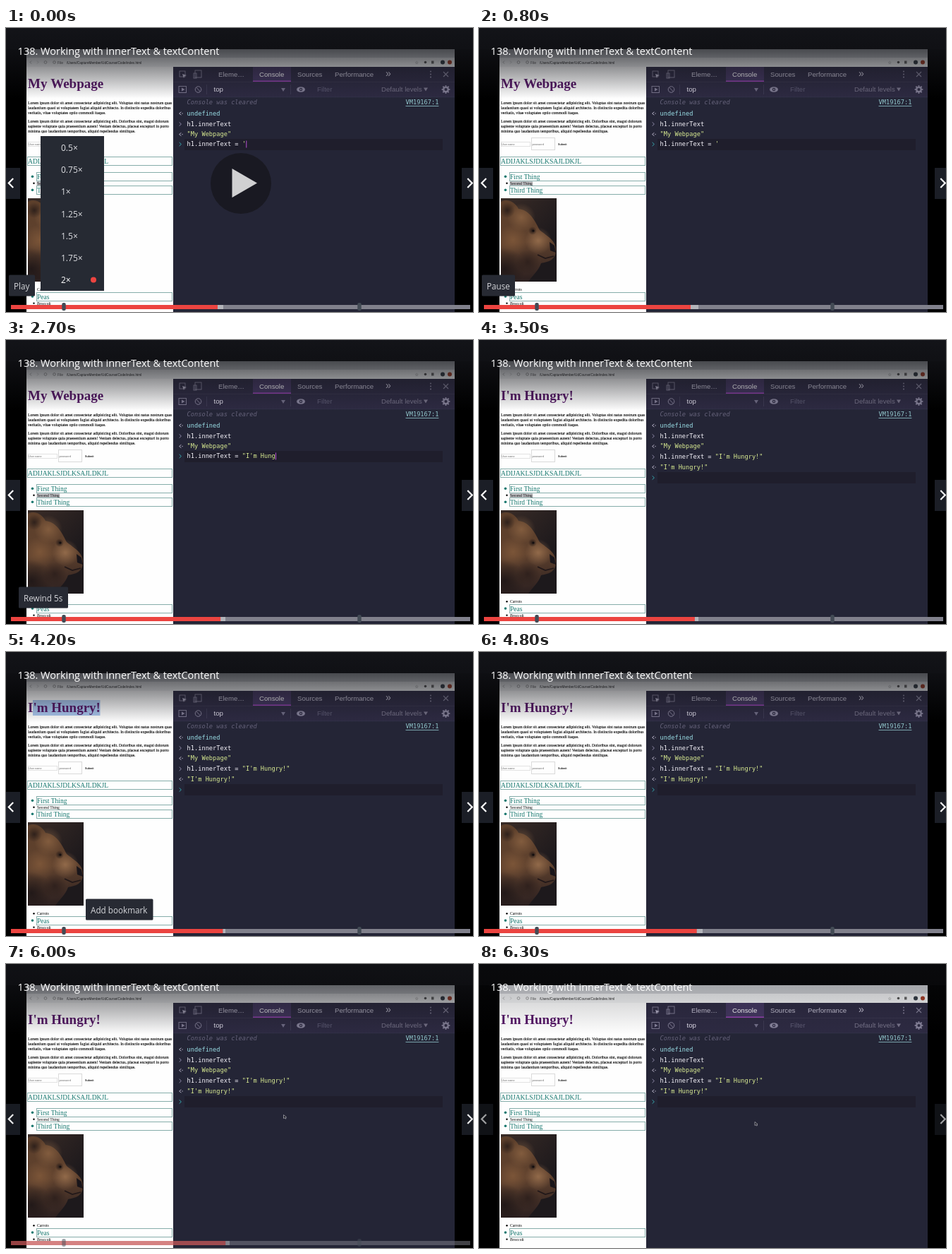
These frames come from a looping animation (662x402 px, 6400 ms). An HTML page with a canvas:

```html
<!DOCTYPE html>
<html lang="en">
<head>
<meta charset="utf-8">
<title>Lesson player</title>
<style>
html, body { margin: 0; width: 100%; height: 100%; overflow: hidden; background: #000; }
canvas { display: block; }
</style>
</head>
<body>
<canvas id="stage" width="662" height="402"></canvas>
<script>
const c = document.getElementById('stage').getContext('2d');
const LOOP = 6400;
const SERIF = '"Liberation Serif", serif';
const SANS = '"Liberation Sans", sans-serif';
const UI = '"Open Sans", sans-serif';
const MONO = '"DejaVu Sans Mono", monospace';
const TEAL = '#17786f', CODE = '#f6f4fb', STRING = '#d9eb92', ICON = '#858199';

const clamp = v => Math.max(0, Math.min(1, v));
const ramp = (t, a, b) => clamp((t - a) / (b - a));
const mix = (a, b, k) => a + (b - a) * k;

function rect(x, y, w, h, color) {
  c.fillStyle = color;
  c.fillRect(x, y, w, h);
}
function rounded(x, y, w, h, r, color) {
  c.fillStyle = color;
  c.beginPath();
  c.roundRect(x, y, w, h, r);
  c.fill();
}
function frame(x, y, w, h, color, line = 1) {
  c.strokeStyle = color;
  c.lineWidth = line;
  c.strokeRect(x, y, w, h);
}
function text(s, x, y, font, color) {
  c.font = font;
  c.fillStyle = color;
  c.fillText(s, x, y);
}
function dot(x, y, r, color) {
  c.fillStyle = color;
  c.beginPath();
  c.arc(x, y, r, 0, 7);
  c.fill();
}
function ring(x, y, r, color, line = 1) {
  c.strokeStyle = color;
  c.lineWidth = line;
  c.beginPath();
  c.arc(x, y, r, 0, 7);
  c.stroke();
}
function glow(x, y, r, rgb, alpha) {
  const g = c.createRadialGradient(x, y, 0, x, y, r);
  g.addColorStop(0, `rgba(${rgb},${alpha})`);
  g.addColorStop(1, `rgba(${rgb},0)`);
  dot(x, y, r, g);
}
function path(points, color, line) {
  c.beginPath();
  points.forEach(([x, y]) => c.lineTo(x, y));
  if (line) {
    c.strokeStyle = color;
    c.lineWidth = line;
    c.stroke();
  } else {
    c.closePath();
    c.fillStyle = color;
    c.fill();
  }
}
// dir 1 points right, -1 points left
const chevron = (x, y, w, h, dir, color, line) =>
  path([[x - dir * w, y - h], [x + dir * w, y], [x - dir * w, y + h]], color, line);

function browserBar() {
  rect(29, 30, 607, 12, '#d0d2d6');
  rect(29, 42, 607, 13, '#f3f4f5');
  chevron(35, 48.5, 1, 2, -1, '#777', 0.6);
  chevron(45, 48.5, 1, 2, 1, '#aaa', 0.6);
  ring(56, 48.5, 1.9, '#777', 0.6);
  ring(68.5, 48.5, 1.8, '#666', 0.6);
  text('File', 73, 50.5, '5px ' + SANS, '#555');
  text('/Users/CaptureMember/UdCourse/Code/index.html', 86, 50.5, '4.7px ' + SANS, '#222');
  text('☆', 579.5, 50.5, '6px "DejaVu Sans", sans-serif', '#444');
  dot(594.5, 48.5, 1.8, '#555');
  rect(603, 46.5, 3.5, 4, '#666');
  dot(619, 48.5, 3, '#333b44');
  dot(629, 48.5, 3, '#a63c25');
}

function paragraph(lines, y) {
  c.strokeStyle = '#111';
  c.lineWidth = 0.12;
  lines.forEach((s, i) => {
    text(s, 31, y + i * 7.1, '5.73px ' + SERIF, '#000');
    c.strokeText(s, 31, y + i * 7.1);
  });
}

function bigItem(label, y) {
  frame(43.5, Math.round(y) - 9.5, 192, 12, '#86adaa');
  dot(37.5, y - 3.5, 1.8, TEAL);
  text(label, 44, y, '9.5px ' + SERIF, TEAL);
}
function smallItem(label, y) {
  dot(39.5, y - 2, 1.2, '#000');
  text(label, 44, y, '5.73px ' + SERIF, '#000');
}

function bear() {
  c.save();
  c.beginPath();
  c.rect(31, 241, 79, 118);
  c.clip();
  const back = c.createLinearGradient(31, 241, 100, 300);
  back.addColorStop(0, '#3a2c27');
  back.addColorStop(1, '#1d191c');
  rect(31, 241, 79, 118, back);
  const fur = c.createLinearGradient(50, 250, 62, 359);
  fur.addColorStop(0, '#5c3f2b');
  fur.addColorStop(0.5, '#60422e');
  fur.addColorStop(1, '#2c2020');
  c.fillStyle = fur;
  c.beginPath();
  c.moveTo(31, 246);
  c.bezierCurveTo(40, 241, 51, 246, 56, 256);
  c.bezierCurveTo(72, 258, 79, 272, 86, 286);
  c.bezierCurveTo(97, 295, 110, 301, 109, 316);
  c.bezierCurveTo(108, 329, 98, 331, 88, 333);
  c.bezierCurveTo(84, 344, 76, 350, 70, 359);
  c.lineTo(31, 359);
  c.fill();
  glow(60, 268, 20, '166,120,80', 0.5);
  glow(84, 301, 19, '178,132,92', 0.6);
  glow(48, 300, 22, '150,104,66', 0.5);
  glow(40, 258, 11, '28,20,20', 0.7);
  glow(36, 341, 30, '24,18,20', 0.75);
  glow(69, 331, 17, '32,22,22', 0.6);
  glow(76, 287, 6, '20,14,16', 0.8);
  dot(77, 287, 1.6, '#120e10');
  path([[100, 303], [107, 308], [109, 318], [101, 315]], '#19151a');
  path([[106, 323], [94, 326], [83, 321]], '#211819', 1.8);
  c.restore();
}

function page(t) {
  rect(29, 55, 208, 347, '#fefefe');
  if (t >= 3900 && t < 4800) {
    const left = mix(133, 38, ramp(t, 3900, 4200));
    rect(left, 68, 133.5 - left, 22, '#a9c6ee');
  }
  text(t < 3300 ? 'My Webpage' : "I'm Hungry!", 31, 84.5, 'bold 19px ' + SERIF, '#551766');
  paragraph(['Lorem ipsum dolor sit amet consectetur adipisicing elit. Voluptas sint natus nostrum quas',
    'laudantium quasi ut voluptatem fugiat aliquid architecto. In distinctio expedita doloribus',
    'veritatis, vitae voluptates optio commodi itaque.'], 107.6);
  paragraph(['Lorem ipsum dolor sit amet consectetur adipisicing elit. Doloribus sint, magni dolorum',
    'sapiente voluptate quia praesentium autem! Veniam delectus, placeat excepturi in porro',
    'minima quo laudantium temporibus, aliquid repellendus similique.'], 133.8);
  frame(31.5, 161.5, 41, 6, '#e2e2e2');
  frame(74.5, 155.5, 33, 17, '#dadada');
  text('User name', 32, 166, '3.8px ' + SANS, '#666');
  text('password', 75.5, 166, '3.8px ' + SANS, '#666');
  text('Submit', 112, 166, 'bold 3.7px ' + SANS, '#222');
  frame(30.5, 182.5, 205, 12, '#86adaa');
  text('ADIJAKLSJDLKSAJLDKJL', 31, 192, '9.55px ' + SERIF, TEAL);
  bigItem('First Thing', 213.7);
  if (t < 3900) rect(43.5, 217, 32.5, 6.2, '#c5c5c9');
  smallItem('Second Thing', 221.8);
  bigItem('Third Thing', 232.7);
  bear();
  smallItem('Carrots', 372.3);
  bigItem('Peas', 383.5);
  smallItem('Broccoli', 391.6);
}

function devtools() {
  rect(237, 55, 399, 347, '#242536');
  rect(237, 55, 399, 43, '#2d2a42');
  rect(350, 55, 54, 20, '#42365f');
  rect(237, 76, 399, 0.7, '#3b3850');
  rect(350, 74.5, 54, 1.5, '#9440b0');
  rect(237, 97.5, 399, 0.7, '#35344a');
  const tab = '9.65px ' + SANS;
  frame(246, 61, 8, 8, ICON, 0.9);
  path([[250, 65], [256, 67], [253, 68], [252, 71]], '#b0acc2');
  frame(268, 60, 9, 10, ICON, 0.9);
  frame(266, 64, 4, 7, ICON, 0.9);
  text('Eleme…', 301, 69, tab, '#c4c1d2');
  text('Console', 359, 69, tab, '#fff');
  text('Sources', 413, 69, tab, '#c4c1d2');
  text('Performance', 466, 69, tab, '#c4c1d2');
  text('»', 538, 69, '14px ' + SANS, '#c4c1d2');
  [61.5, 65.5, 69.5].forEach(y => dot(602, y, 1, ICON));
  path([[620, 62], [627, 69]], ICON, 1.1);
  path([[627, 62], [620, 69]], ICON, 1.1);

  frame(245, 82.5, 10.5, 9, ICON, 0.9);
  path([[249, 84.5], [253.5, 87], [249, 89.5]], ICON);
  ring(272.5, 87, 4.3, ICON);
  path([[269.5, 84], [275.5, 90]], ICON, 1);
  rect(284, 80, 0.7, 14, '#46435b');
  text('top', 294.5, 90, tab, '#e4e1ee');
  path([[390, 85], [396, 85], [393, 90]], '#716d87');
  rect(403, 80, 0.7, 14, '#46435b');
  c.fillStyle = ICON;
  c.beginPath();
  c.ellipse(418, 87, 6, 3.8, 0, 0, 7);
  c.fill();
  dot(418, 87, 2.2, '#2d2a42');
  dot(418, 87, 1.1, ICON);
  text('Filter', 441, 90, tab, '#5e5b74');
  text('Default levels', 532, 90, tab, '#777389');
  path([[592, 84.5], [598, 84.5], [595, 89.5]], '#777389');
  ring(623.5, 87, 3.3, ICON, 2.4);
  for (let i = 0; i < 8; i++) {
    const a = i * Math.PI / 4;
    dot(623.5 + 5 * Math.cos(a), 87 + 5 * Math.sin(a), 1.1, ICON);
  }
}

function typed(t) {
  if (t < 1500) return "'";
  if (t < 1800) return "'I";
  if (t < 1900) return '';
  return '"I\'m Hungry!"'.slice(0, 1 + Math.floor((t - 1900) / 100));
}

function consoleLog(t) {
  const font = '8.66px ' + MONO;
  const line = (s, y, color) => text(s, 256.6, y + 2.7, font, color);
  const input = (y, color = '#8d88a6') => chevron(247, y, 1.4, 2.6, 1, color, 1);
  const output = y => {
    chevron(247, y, 1.4, 2.2, -1, '#b5b1c6', 1);
    dot(250, y, 0.7, '#b5b1c6');
  };
  text('Console was cleared', 256.6, 108.2, 'italic ' + font, '#66637b');
  text('VM19167:1', 566.5, 108.2, font, '#93c8ce');
  rect(566.5, 110, 46.9, 0.8, '#93c8ce');
  output(121);
  line('undefined', 121, '#9be0e8');
  input(136);
  line('h1.innerText', 136, CODE);
  output(150.5);
  line('"My Webpage"', 150.5, STRING);

  const done = t >= 3300;
  const y = done ? 165.5 : 164.5;
  const command = 'h1.innerText = ';
  const value = typed(t);
  if (!done) rect(253, 157, 366, 16, '#1f1e2c');
  input(y, done ? undefined : '#37a5ad');
  line(command, y, CODE);
  const start = 256.6 + c.measureText(command).width;
  text(value, start, y + 2.7, font, STRING);
  if (done) {
    output(180);
    line('"I\'m Hungry!"', 180, STRING);
    rect(253, 187, 366, 16, '#1f1e2c');
    input(195, '#37a5ad');
  } else if (t < 500 || t >= 1500) {
    rect(start + c.measureText(value).width + 0.3, y - 5, 1, 10, '#b44fd0');
  }
}

function pointer(t) {
  if (t < 4900) return;
  const across = ramp(t, 4800, 5300), down = ramp(t, 5500, 6100);
  const x = mix(mix(60, 406, across), 391, down);
  const y = mix(mix(80, 164, across), 223.5, down);
  const shape = [[x, y], [x, y + 5], [x + 1.4, y + 4], [x + 2.5, y + 5.6], [x + 3.5, y + 5], [x + 2.6, y + 3.6], [x + 4, y + 3.3]];
  path(shape, '#15151c');
  path([...shape, shape[0]], '#d5d5dd', 0.6);
}

function topShade(t) {
  const strength = mix(1, 0.32, ramp(t, 5900, 6300));
  const g = c.createLinearGradient(0, 0, 0, 100);
  g.addColorStop(0, `rgba(20,21,26,${0.92 * strength})`);
  g.addColorStop(0.3, `rgba(20,21,26,${0.72 * strength})`);
  g.addColorStop(1, 'rgba(20,21,26,0)');
  rect(0, 0, 662, 30, '#050506');
  rect(0, 0, 662, 100, g);
  text('138. Working with innerText & textContent', 16.6, 38, '14.5px ' + UI, '#fff');
}

function sideArrows(t) {
  c.globalAlpha = mix(1, 0.6, ramp(t, 5900, 6300));
  rect(0, 198, 20, 44, '#1b1e26');
  rect(646, 198, 16, 44, '#1b1e26');
  chevron(7, 219.5, 3.2, 6.5, -1, '#fff', 2.2);
  chevron(657.5, 219.5, 3.2, 6.5, 1, '#fff', 2.2);
  c.globalAlpha = 1;
}

function progress(t) {
  c.globalAlpha = 1 - ramp(t, 5800, 6200);
  const played = 300 + Math.max(0, t - 800) * 0.00215;
  const buffered = t < 500 ? 308 : t < 4700 ? 311 : 317;
  rect(7, 392, 651, 6, '#81818c');
  rect(played, 392, buffered - played, 6, '#b3b4ba');
  rect(7, 392, played - 7, 6, '#ec4440');
  [82, 501].forEach(x => rounded(x - 2.7, 389, 5.4, 11, 2, '#434b55'));
  c.globalAlpha = 1;
}

function tooltip(label, x, w) {
  rounded(x, 349.5, w, 30, 1.5, '#272a33');
  text(label, x + 7, 369.7, '11.7px ' + UI, '#d5d6da');
}
function tooltips(t) {
  if (t < 500) tooltip('Play', 4, 37);
  else if (t < 1300) tooltip('Pause', 4, 47);
  else if (t < 3400) tooltip('Rewind 5s', 18, 70);
  else if (t >= 3600 && t < 4800) tooltip('Add bookmark', 113, 95.5);
}

function speedMenu() {
  rect(49, 153, 90, 219, '#262a33');
  ['0.5', '0.75', '1', '1.25', '1.5', '1.75', '2'].forEach((rate, i) =>
    text(rate + '×', 78, 174 + i * 31.2, '12px ' + UI, i === 6 ? '#fff' : '#dddee2'));
  dot(124, 356.5, 4, '#ec4440');
}

function playBadge() {
  dot(333, 220, 43, 'rgba(24,24,31,.88)');
  path([[320.5, 199], [356, 219.5], [320.5, 240]], '#d0d0d2');
}

function draw(now) {
  const t = Math.floor(now % LOOP / 100) * 100;
  rect(0, 0, 662, 402, '#000');
  browserBar();
  page(t);
  devtools();
  consoleLog(t);
  pointer(t);
  topShade(t);
  if (t < 500) playBadge();
  sideArrows(t);
  progress(t);
  if (t < 300) speedMenu();
  tooltips(t);
}

let begin;
function tick(now) {
  begin ??= now;
  draw(now - begin);
  requestAnimationFrame(tick);
}
requestAnimationFrame(tick);
</script>
</body>
</html>
```
